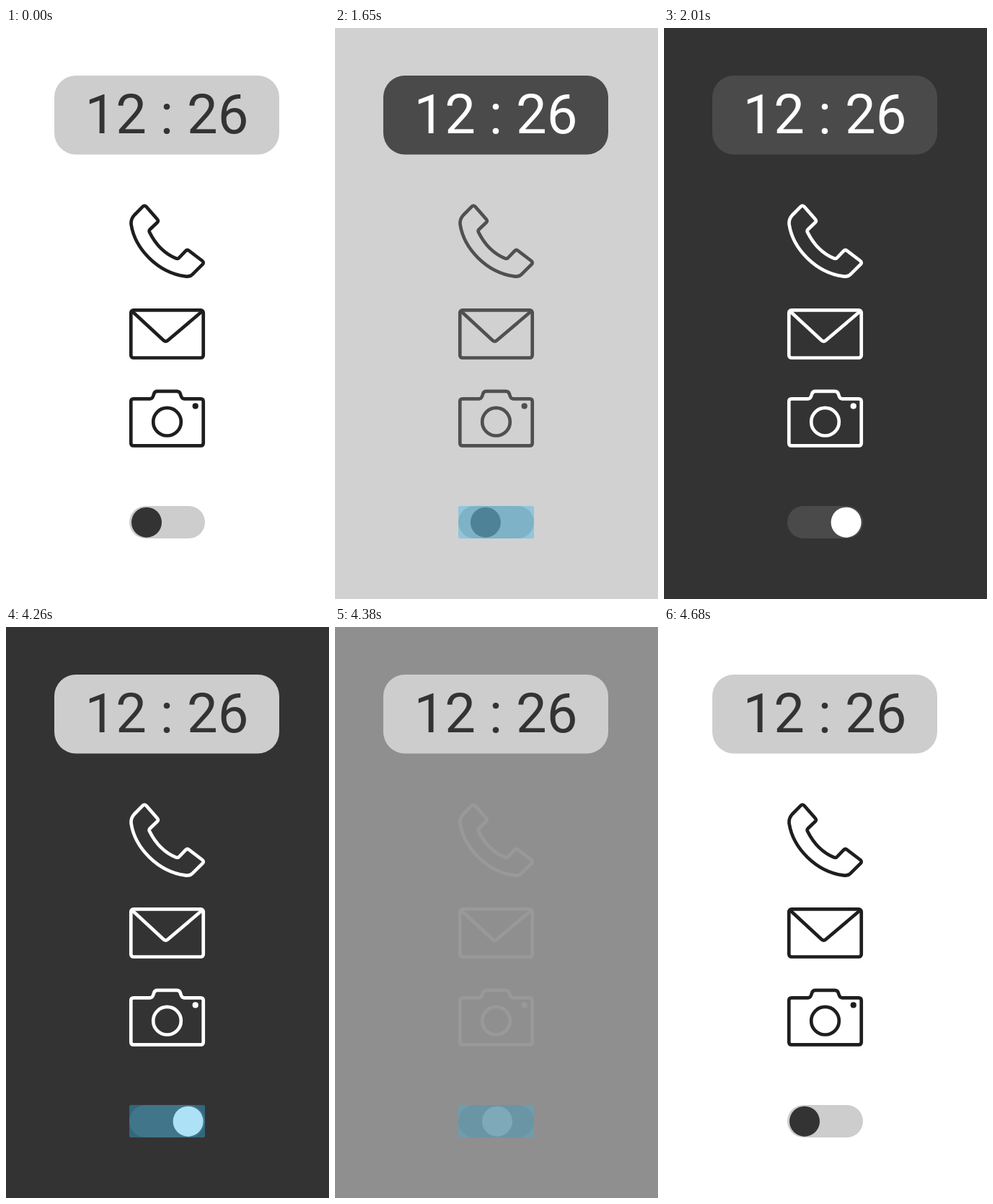
Recreate the animation shown at these times as an HTML page. Size 448 px wide and 792 px high, loop 5700 ms.

```html
<!DOCTYPE html>
<html lang="en">
<head>
<meta charset="utf-8">
<title>Theme switch</title>
<style>
  html, body { margin: 0; width: 100%; height: 100%; overflow: hidden; }
  svg { display: block; width: 100%; height: 100%; }
  #clock text { font: 400 76px Roboto, sans-serif; text-anchor: middle; white-space: pre; }
  #icons { fill: none; stroke-width: 4.7; stroke-linejoin: round; stroke-linecap: round; }
</style>
</head>
<body>
<svg viewBox="0 0 448 792">
  <rect id="page" width="448" height="792"/>
  <g id="clock">
    <rect id="plate" x="67" y="66" width="312" height="109.5" rx="30"/>
    <text id="time" x="223" y="146.3">12 : 26</text>
  </g>
  <g id="icons">
    <path d="M189.5 247.8 Q192 245.2 194.5 247.8 L209.8 265.2 Q211.8 267.5 209.8 269.7
      L199.8 279.3 Q197.8 281.3 199.3 283.7 C208 301 220 313 236 319.6 Q238.5 320.5 240.3 318.5
      L249 309.3 Q251.5 306.8 254 309 L272.3 323 Q275 325.3 272.6 327.8
      L258.5 341.8 C255.5 344.8 252.5 345.2 248.5 344.4 C210 339 179 306 173.7 273
      C173 268.5 174 264 178 259.5 Z"/>
    <rect x="173.3" y="391.3" width="100.4" height="66.2" rx="3.5"/>
    <path d="M175 393 L218.5 433.3 Q221.5 436 224.5 433.3 L272 393"/>
    <path d="M177 514.3 H200 C203 514.3 204 512 205 508 Q206 503.8 210 503.8 H237
      Q241 503.8 242 508 C243 512 244 514.3 247 514.3 H270 Q273.7 514.3 273.7 518
      V575.7 Q273.7 579.4 270 579.4 H177 Q173.3 579.4 173.3 575.7 V518 Q173.3 514.3 177 514.3 Z"/>
    <circle cx="223.5" cy="546.2" r="19.3"/>
    <circle id="dot" cx="262.7" cy="524.4" r="4.1" stroke="none"/>
  </g>
  <rect id="track" x="171" y="663" width="105" height="45" rx="22.5"/>
  <circle id="knob" cx="195" cy="685.7" r="21"/>
  <rect id="tap" x="171" y="663" width="105" height="45" rx="2.5" fill="rgb(51,181,229)"/>
</svg>
<script>
const LOOP = 5700, TO_DARK = 1590, TO_LIGHT = 4260;
const $ = id => document.getElementById(id);
const set = (id, name, value) => $(id).setAttribute(name, value);
const clamp = x => Math.min(1, Math.max(0, x));
const mix = (a, b, k) => a + (b - a) * k;

function gray(a, b, k) {
  const v = Math.round(mix(a, b, k));
  return `rgb(${v},${v},${v})`;
}

// cubic-bezier(.25, .1, .25, 1)
function ease(x) {
  x = clamp(x);
  if (x === 0 || x === 1) return x;
  let lo = 0, hi = 1, s = x;
  for (let i = 0; i < 24; i++) {
    s = (lo + hi) / 2;
    const bx = .75 * s * (1 - s) + s ** 3;
    if (bx < x) lo = s; else hi = s;
  }
  return .3 * s * (1 - s) ** 2 + 3 * s * s * (1 - s) + s ** 3;
}

// 0 = light, 1 = dark
function theme(t, span) {
  return t < 3000 ? ease((t - 1577) / span) : 1 - ease((t - 4262) / span);
}

function tapAlpha(t) {
  const age = t - (t < TO_LIGHT ? TO_DARK : TO_LIGHT);
  return age < 0 ? 0 : .4 * clamp((205 - age) / 100);
}

function draw(t) {
  const on = t >= TO_DARK && t < TO_LIGHT ? 1 : 0;
  const k = t < TO_DARK ? 0 : theme(t, 440);
  const slide = t < TO_DARK ? 0 : theme(t, 420);
  const ink = gray(30, 255, k);
  set('page', 'fill', gray(255, 51, k));
  set('plate', 'fill', gray(205, 74, on));
  set('time', 'fill', gray(51, 255, on));
  set('icons', 'stroke', ink);
  set('dot', 'fill', ink);
  set('track', 'fill', gray(205, 74, k));
  set('knob', 'fill', gray(51, 255, k));
  set('knob', 'cx', mix(195, 252.6, slide));
  set('tap', 'opacity', tapAlpha(t));
}

const start = performance.now();
function tick() {
  draw((performance.now() - start) % LOOP);
  requestAnimationFrame(tick);
}
draw(0);
requestAnimationFrame(tick);
</script>
</body>
</html>
```
